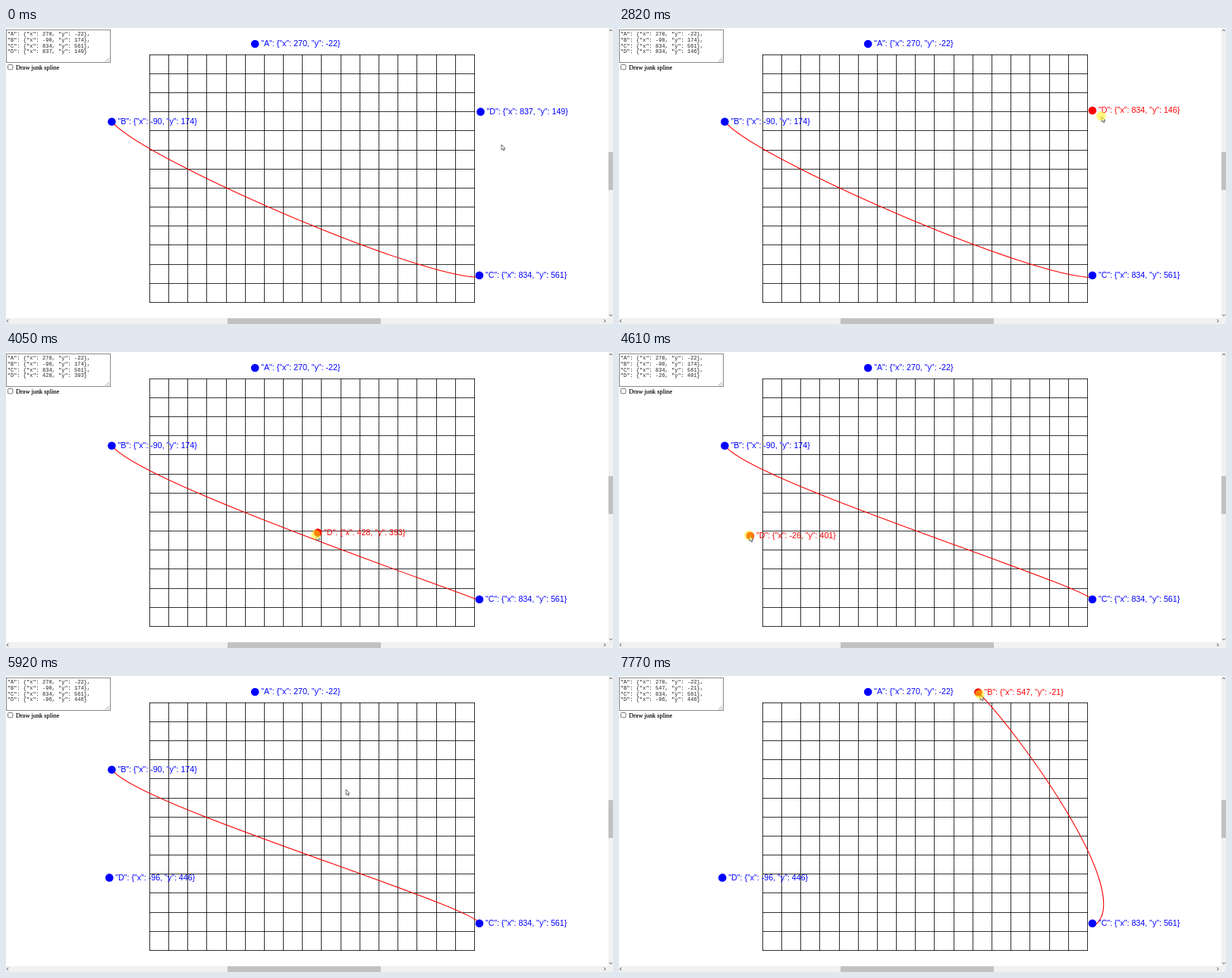
An HTML page for the animation above (8 s loop, 800x391 px).

```html
<!DOCTYPE html>
<html lang="en">
<head>
<meta charset="utf-8">
<title>Spline editor</title>
<style>
html, body { margin: 0; width: 100%; height: 100%; overflow: hidden; background: #fff; }
svg { display: block; width: 800px; height: 391px; }
.label { font: 10.65px "Liberation Sans", Arial, sans-serif; }
.code { font: 7px "Liberation Mono", "Courier New", monospace; white-space: pre; }
.check { font: 8.3px "Liberation Serif", serif; stroke: #000; stroke-width: .15; }
</style>
</head>
<body>
<svg viewBox="0 0 800 391">
  <g stroke="#000" stroke-opacity=".8"><path id="columns"/><path id="rows"/></g>
  <path id="curve" fill="none" stroke="#f00" stroke-width="1.1"/>
  <rect x=".5" y="2.5" width="137" height="43" fill="#fff" stroke="#8a8a8a"/>
  <path d="M131 44.5l5-5M134 44.5l2-2" stroke="#777" stroke-width=".7"/>
  <g id="code" class="code" fill="#222"></g>
  <rect x="2.5" y="48.5" width="6.4" height="6.4" rx="1" fill="#fff" stroke="#666" stroke-width=".9"/>
  <text class="check" x="13" y="55">Draw junk spline</text>
  <g id="points"></g>
  <path fill="#f1f1f1" d="M794 0h6v391H0v-8h794z"/>
  <path fill="#c1c1c1" d="M794 164h6v50h-6zM292 383.5h202v7.5H292z"/>
  <path fill="none" stroke="#555" d="M3.2 385l-2 2 2 2M788.2 385l2 2-2 2M795.3 4l1.8-2 1.8 2M795.3 378.5l1.8 2 1.8-2"/>
  <path id="cursor" d="M0 0V7L1.6 5.6 2.8 8 4 7.5 2.9 5.2H5Z" fill="#fff" stroke="#333" stroke-width=".7"/>
  <circle id="glow" cx="-.6" cy="-.8" r="6.2" fill="#ffee10" opacity=".55"/>
</svg>
<script>
const $ = id => document.getElementById(id);
const LOOP = 8000, START = 943, STEP = 110.1;
const SCALE = 0.5244, LEFT = 186.6, TOP = 32.5, CELL = 25.174;

// Each move: first step, last step, x and y reached. Between moves things rest.
const points = {
  A: { from: [270, -22], moves: [] },
  B: { from: [-90, 174], moves: [[56, 62, 547, -21]] },
  C: { from: [834, 561], moves: [] },
  D: { from: [837, 149], moves: [
    [16, 17, 834, 146], [17, 20, 937, 250], [20, 23, 882, 384],
    [23, 33, -26, 401], [33, 37, -96, 446]
  ] }
};
const pointer = { from: [653, 154], moves: [
  [-1, 1, 750, 376], [1, 3, 705, 249], [6, 14, 629, 113],
  [16, 17, 636, 117], [17, 20, 682, 175], [20, 23, 646, 241],
  [23, 33, 172, 243], [33, 37, 137, 268],
  [41, 44, 505, 147], [44, 45, 448, 150], [45, 56, 142, 125], [56, 62, 476, 25]
] };

const ease = f => f * f * (3 - 2 * f);

function at({ from, moves }, k) {
  let [x, y] = from;
  for (const [start, end, toX, toY] of moves) {
    const f = ease(Math.min(1, Math.max(0, (k - start) / (end - start))));
    x += (toX - x) * f;
    y += (toY - y) * f;
  }
  return [x, y];
}

function add(parent, tag, attrs) {
  const el = document.createElementNS("http://www.w3.org/2000/svg", tag);
  for (const name in attrs) el.setAttribute(name, attrs[name]);
  return parent.appendChild(el);
}

const move = (el, [x, y]) => el.setAttribute("transform", `translate(${x} ${y})`);
const toPx = ([x, y]) => [LEFT + x * SCALE, TOP + y * SCALE];

const lines = (count, first, path) => Array.from({ length: count },
  (_, i) => path(Math.floor(first + i * CELL + .2) + .5)).join("");
$("columns").setAttribute("d", lines(18, 189.2, x => `M${x} 35V363`));
$("rows").setAttribute("d", lines(14, 35, y => `M189 ${y}H618`));

const views = Object.keys(points).map((name, i) => {
  const group = add($("points"), "g", {});
  add(group, "circle", { r: 5.3 });
  return {
    name, group,
    label: add(group, "text", { class: "label", x: 8, y: 3.2 }),
    line: add($("code"), "text", { x: 1.8, y: 10.4 + i * 7.6 })
  };
});

function draw(time) {
  const k = Math.max(-1, Math.floor((time % LOOP - START) / STEP));
  const held = k >= 56 ? "B" : k >= 16 && k < 41 ? "D" : "";
  const pos = {};
  for (const { name, group, label, line } of views) {
    const [x, y] = pos[name] = at(points[name], k).map(Math.round);
    const text = `"${name}": {"x": ${x}, "y": ${y}}`;
    label.textContent = text;
    line.textContent = text + (name === "D" ? "" : ",");
    group.setAttribute("fill", name === held ? "#f00" : "#00f");
    move(group, toPx([x, y]));
  }

  // Catmull-Rom segment from B to C, written as a cubic Bezier.
  const { A, B, C, D } = pos;
  const spot = f => toPx([0, 1].map(n => f(n) + 5.3)).join(" ");
  $("curve").setAttribute("d", `M${spot(n => B[n])}C${spot(n => B[n] + (C[n] - A[n]) / 6)} ` +
    `${spot(n => C[n] - (D[n] - B[n]) / 6)} ${spot(n => C[n])}`);

  const tip = at(pointer, k);
  move($("cursor"), tip);
  move($("glow"), tip);
  $("glow").setAttribute("visibility", held ? "visible" : "hidden");
}

const begin = performance.now();
function tick() {
  draw(performance.now() - begin);
  requestAnimationFrame(tick);
}
tick();
</script>
</body>
</html>
```
